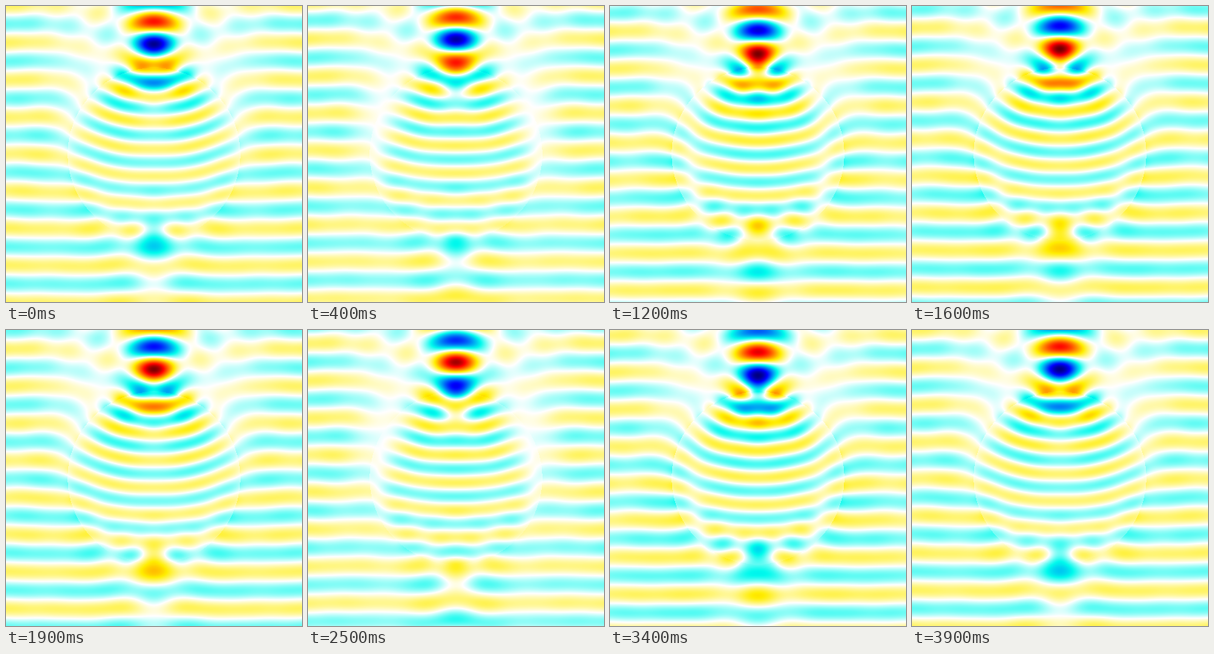
A matplotlib script that plays this animation: 400x400 px, repeating every 4 s.

```python
import numpy as np
import matplotlib.pyplot as plt
from matplotlib.animation import FuncAnimation
from matplotlib.colors import LinearSegmentedColormap

# Plane wave travelling upwards through a dielectric sphere (Mie series).
SIZE = 400
FRAMES = 40
WAVELENGTH = 50.0
RADIUS = 7 / 3 * WAVELENGTH
INDEX = 1.355
ORDERS = 30
YELLOW_LEVEL = 1.8   # field strength, in incident amplitudes

K = 2 * np.pi / WAVELENGTH


def bessel_j(rho):
    """Spherical Bessel j_0..j_ORDERS by downward recurrence."""
    rho = np.asarray(rho, float)
    out = np.zeros((ORDERS + 1,) + rho.shape)
    upper, cur = np.zeros_like(rho), np.full_like(rho, 1e-120)
    for n in range(ORDERS + 30, -1, -1):
        if n <= ORDERS:
            out[n] = cur
        upper, cur = cur, (2 * n + 1) / rho * cur - upper
    j0 = np.sin(rho) / rho
    j1 = j0 / rho - np.cos(rho) / rho
    use_j0 = np.abs(j0) > np.abs(j1)
    return out * np.where(use_j0, j0, j1) / np.where(use_j0, out[0], out[1])


def bessel_y(rho):
    """Spherical Bessel y_0..y_ORDERS by upward recurrence."""
    rho = np.asarray(rho, float)
    y = [-np.cos(rho) / rho]
    y.append(y[0] / rho - np.sin(rho) / rho)
    for n in range(1, ORDERS):
        y.append((2 * n + 1) / rho * y[n] - y[n - 1])
    return np.array(y)


def hankel(rho):
    return bessel_j(rho) + 1j * bessel_y(rho)


def slope(z, rho, n):
    """Derivative of rho * z_n(rho)."""
    return rho * z[n - 1] - n * z[n]


def mie_coefficients():
    x, mx = K * RADIUS, INDEX * K * RADIUS
    jx, jmx, hx = bessel_j(x), bessel_j(mx), hankel(x)
    coefs = []
    for n in range(1, ORDERS + 1):
        p, dp = x * jx[n], slope(jx, x, n)
        q, dq = mx * jmx[n], slope(jmx, mx, n)
        h, dh = x * hx[n], slope(hx, x, n)
        den_e = INDEX * q * dh - h * dq
        den_m = q * dh - INDEX * h * dq
        a = (INDEX * q * dp - p * dq) / den_e
        b = (q * dp - INDEX * p * dq) / den_m
        c = 1j * INDEX / den_m
        d = 1j * INDEX / den_e
        coefs.append((a, b, c, d))
    return coefs


def series(z, rho, cos_t, sin_t, weights):
    """Transverse field of sum E_n (m M_n + e N_n) in the polarisation plane."""
    e_r = np.zeros(rho.shape, complex)
    e_t = np.zeros(rho.shape, complex)
    pi_prev, pi_n = np.zeros_like(rho), np.ones_like(rho)
    for n, (m, e) in enumerate(weights, 1):
        tau = n * cos_t * pi_n - (n + 1) * pi_prev
        scale = 1j ** n * (2 * n + 1) / (n * (n + 1))
        e_r += scale * e * n * (n + 1) * sin_t * pi_n * z[n] / rho
        e_t += scale * (m * pi_n * z[n] + e * tau * slope(z, rho, n) / rho)
        pi_next = ((2 * n + 1) * cos_t * pi_n - (n + 1) * pi_prev) / n
        pi_prev, pi_n = pi_n, pi_next
    return e_r * sin_t + e_t * cos_t


def total_field():
    axis = np.arange(SIZE) + 0.5 - SIZE / 2
    x, z = np.meshgrid(np.abs(axis), -axis)
    r = np.hypot(x, z)
    cos_t, sin_t = z / r, x / r
    inside = r < RADIUS
    outside = ~inside
    coefs = mie_coefficients()

    field = np.exp(1j * K * z)
    rho = K * r[outside]
    field[outside] += series(hankel(rho), rho, cos_t[outside], sin_t[outside],
                             [(-b, 1j * a) for a, b, c, d in coefs])
    rho = INDEX * K * r[inside]
    field[inside] = series(bessel_j(rho), rho, cos_t[inside], sin_t[inside],
                           [(c, -1j * d) for a, b, c, d in coefs])
    return field


def make_cmap(level):
    """White at zero; yellow to dark red above, cyan to dark blue below."""
    warm = [(level, (1, 0.93, 0)), (0.75, (1, 0, 0)), (1, (0.45, 0, 0))]
    cold = [(level, (0, 0.98, 0.93)), (0.75, (0, 0, 1)), (1, (0, 0, 0.5))]
    stops = [(0.5 - p / 2, c) for p, c in reversed(cold)]
    stops.append((0.5, (1, 1, 1)))
    stops += [(0.5 + p / 2, c) for p, c in warm]
    return LinearSegmentedColormap.from_list("wave", stops, N=1024)


field = total_field()
peak = np.abs(field).max()

fig = plt.figure(figsize=(4, 4), dpi=100)
ax = fig.add_axes([0, 0, 1, 1])
ax.axis("off")
image = ax.imshow(field.real, cmap=make_cmap(min(YELLOW_LEVEL / peak, 0.6)),
                  vmin=-peak, vmax=peak, interpolation="nearest",
                  aspect="auto")


def update(frame):
    image.set_data((field * np.exp(-2j * np.pi * frame / FRAMES)).real)
    return [image]


anim = FuncAnimation(fig, update, frames=FRAMES, interval=100,
                     repeat=True, repeat_delay=0)
plt.show()
```
